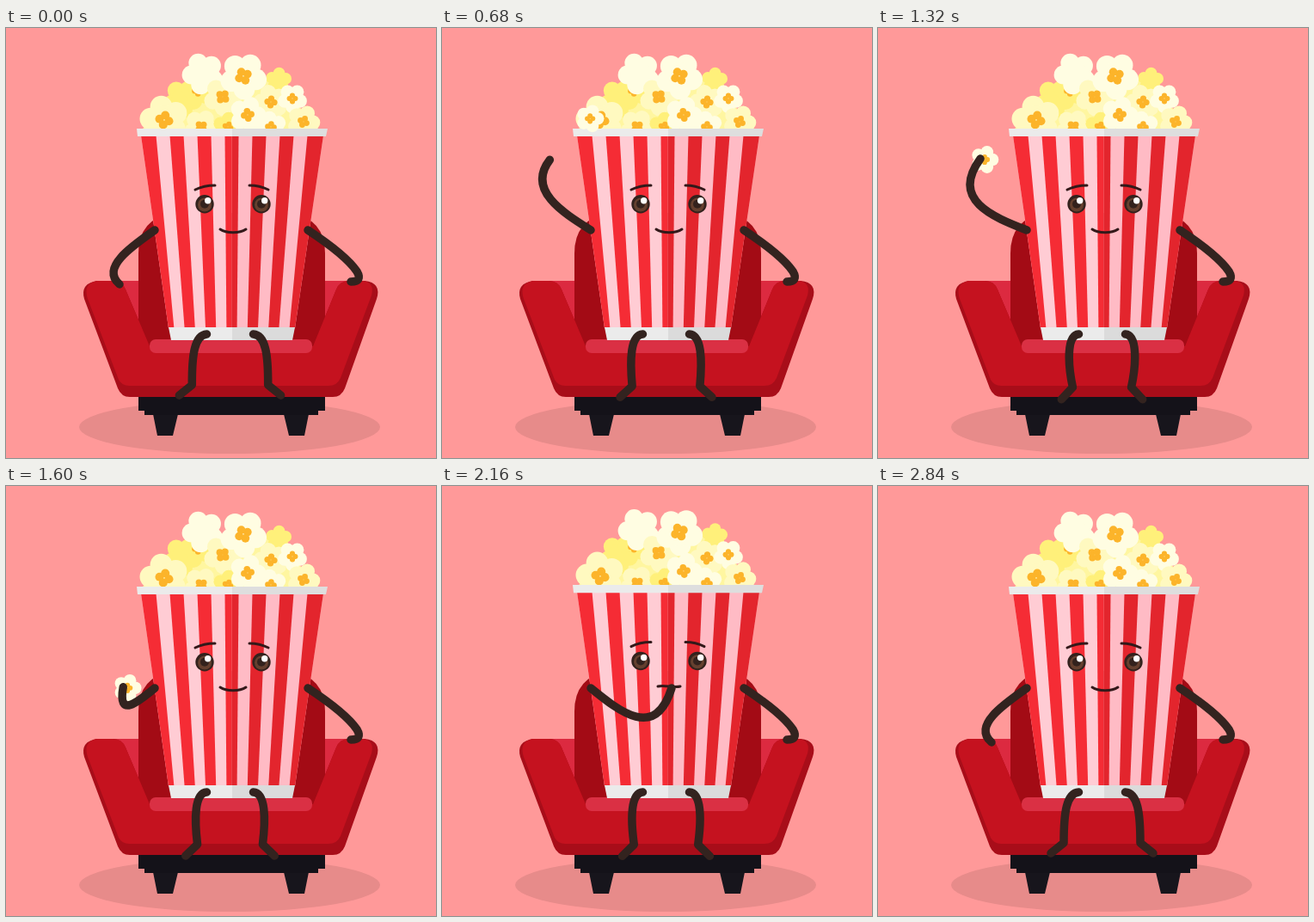
An HTML page that plays this animation: 500 px wide and 500 px high, repeating every 2.88 s.

```html
<!DOCTYPE html>
<html lang="en">
<head>
<meta charset="utf-8">
<title>Popcorn on a sofa</title>
<style>
  html, body { margin: 0; width: 100%; height: 100%; overflow: hidden; background: #ff9999; }
  svg { display: block; width: 100%; height: 100%; }
  .limb { fill: none; stroke: #33231f; stroke-width: 9.5; stroke-linecap: round; stroke-linejoin: round; }
  .line { fill: none; stroke: #33191a; stroke-width: 3; stroke-linecap: round; stroke-linejoin: round; }
</style>
</head>
<body>
<svg viewBox="0 0 500 500">
  <ellipse cx="260" cy="464" rx="175" ry="31" fill="#e78b8a"/>

  <g id="sofa">
    <path d="M171 449H200L194 474H176ZM323 449H352L347 474H329Z" fill="#17151c"/>
    <path d="M154 428H371V445H363V450H161V445H154Z" fill="#141219"/>
    <path d="M104 294H160V380H130ZM365 294H418L390 380H365Z" fill="#dc2a40"/>
    <path d="M154 380V262Q154 222 194 215H331Q371 222 371 262V380Z" fill="#a30b15"/>
    <path id="frame" d="M106 294H124Q135 294 139 304L167 370H357L384 304Q388 294 399 294H417Q437 296 431 315L394 419Q390 429 380 429H144Q134 429 130 419L91 315Q86 297 106 294Z" fill="#a80d19"/>
    <path d="M106 294H124Q135 294 139 304L167 370H357L384 304Q388 294 399 294H415Q429 296 425 311L389 407Q385 416 375 416H143Q135 416 131 409L95 315Q89 297 106 294Z" fill="#c5121f"/>
    <rect x="167" y="362" width="189" height="16" rx="7" fill="#da3044"/>
  </g>

  <g id="bucket">
    <g id="heap"></g>
    <clipPath id="cup"><path d="M157 125H369L336 349H189Z"/></clipPath>
    <g id="stripes" clip-path="url(#cup)"></g>
    <path d="M152 117H263V126H153Z" fill="#ebebeb"/>
    <path d="M263 117H374L372 126H263Z" fill="#dedede"/>
    <path d="M189 348H263V363H192Z" fill="#ebebeb"/>
    <path d="M263 348H336L333 363H263Z" fill="#dbdbdb"/>
    <g id="eyes"></g>
    <path class="line" d="M220 188Q230 183 243 183M283 183Q295 183 305 188"/>
    <path class="line" id="mouth" style="fill:#33191a"/>
  </g>

  <path class="limb" id="legL"/>
  <path class="limb" id="legR" transform="matrix(-1 0 0 1 521 0)"/>
  <path class="limb" d="M351 235Q395 264 408 283Q415 295 401 295"/>
  <g id="snack"></g>
  <path class="limb" id="arm"/>
</svg>

<script>
const LOOP = 2880, TAU = 2 * Math.PI;
const $ = id => document.getElementById(id);
const circle = (x, y, r, fill) => `<circle cx="${x}" cy="${y}" r="${r}" fill="${fill}"/>`;

// A ring of equal circles
const ring = (x, y, count, dist, r, turn, fill) => Array.from({ length: count }, (_, i) => {
  const a = turn + i * TAU / count;
  return circle(x + Math.cos(a) * dist, y + Math.sin(a) * dist, r, fill);
}).join('');

const TONES = { white: '#fffde2', cream: '#fff9c0', yellow: '#fff07a' };
const popcorn = (x, y, r, tone, heart = true) =>
  ring(x, y, 5, r * .56, r * .46, x + y, TONES[tone]) + circle(x, y, r * .6, TONES[tone]) +
  (heart ? ring(x, y, 4, r * .2, r * .18, x, '#fcb42a') : '');

$('heap').innerHTML =
  '<path d="M158 118L190 88L230 56H300L340 90L362 118Z" fill="#fff6a0"/>' +
  popcorn(206, 82, 22, 'yellow', false) +
  popcorn(317, 61, 15, 'yellow', false) +
  popcorn(223, 73, 18, 'yellow') +
  popcorn(229, 53, 24, 'white', false) +
  popcorn(252, 80, 22, 'cream') +
  popcorn(276, 56, 27, 'white') +
  popcorn(308, 86, 20, 'cream') +
  popcorn(333, 82, 17, 'white') +
  popcorn(346, 109, 19, 'cream') +
  popcorn(227, 115, 20, 'cream') +
  popcorn(258, 115, 17, 'yellow') +
  popcorn(308, 115, 18, 'white') +
  popcorn(281, 101, 21, 'white') +
  popcorn(184, 107, 28, 'cream');

// Stripes converge from the rim to the foot, each half with its own shade
const AXIS = 262.5;
const stripe = (from, to, fill) =>
  `<path d="M${AXIS + from * 16} 125H${AXIS + to * 16}L${AXIS + to * 12.2} 349H${AXIS + from * 12.2}Z" fill="${fill}"/>`;
let stripes = stripe(-7, 0, '#ffccd4') + stripe(0, 7, '#ffbbc5');
for (let i = 0; i <= 6; i += 2) {
  const inner = Math.max(i - .5, 0), outer = i === 6 ? 7 : i + .5;
  stripes += stripe(-outer, -inner, '#f52c35') + stripe(inner, outer, '#e3252d');
}
$('stripes').innerHTML = stripes;

$('eyes').innerHTML = [231, 297].map(x =>
  circle(x, 204.7, 10.7, '#33221d') + circle(x, 205.5, 8, '#65402f') +
  circle(x, 204.7, 5, '#33221d') + circle(x + 3.7, 200.7, 3.7, '#fff')).join('');

$('snack').innerHTML = popcorn(0, 0, 16, 'white');

// Arm poses: elbow pull and hand
const SHOULDER = [173, 235];
const rest = [110, 279, 132, 298];
const reach = [97, 257, 125, 261];
const swingOut = [93, 245, 104, 226];
const grab = [105, 139, 152, 104];
const lift = [84, 200, 119, 152];
const lower = [102, 265, 114, 235];
const feed = [234, 282, 258, 228];
const chewing = [248, 296, 267, 235];
const armKeys = [
  [0, rest], [100, rest], [400, reach], [490, swingOut], [900, grab], [1080, grab],
  [1320, lift], [1500, lower], [1880, feed], [2000, chewing], [2240, chewing],
  [2740, rest], [LOOP, rest]
];

// Monotone cubic interpolation through timed poses
function poseAt(keys, t) {
  const i = keys.findIndex((_, n) => t < keys[n + 1][0]);
  const [t0, from] = keys[i], [t1, to] = keys[i + 1];
  const span = t1 - t0, u = (t - t0) / span;
  const slope = (n, c) => keys[n] && keys[n + 1]
    ? (keys[n + 1][1][c] - keys[n][1][c]) / (keys[n + 1][0] - keys[n][0]) : 0;
  const tangent = (n, c) => {
    const a = slope(n - 1, c), b = slope(n, c);
    return a * b > 0 ? 2 * a * b / (a + b) : 0;
  };
  return from.map((p, c) => p + (to[c] - p) * u * u * (3 - 2 * u)
    + span * u * (1 - u) * ((1 - u) * tangent(i, c) - u * tangent(i + 1, c)));
}
const ramp = (t, a, b) => {
  const u = Math.min(1, Math.max(0, (t - a) / (b - a)));
  return u * u * (3 - 2 * u);
};
const mix = (a, b, u) => a + (b - a) * u;

function drawLegs(t) {
  const k = (1 - Math.cos((t + 50) / 960 * TAU)) / 2;
  const path = `M233.5 356C219 357 ${216 + 5 * k} ${380 + 12 * k} ${216 + 11 * k} ${415 + 3 * k}` +
    `L${201 + 13 * k} ${427 + 5 * k}`;
  $('legL').setAttribute('d', path);
  $('legR').setAttribute('d', path);
}

function drawArm(t) {
  const [ex, ey, hx, hy] = poseAt(armKeys, t), [sx, sy] = SHOULDER;
  $('arm').setAttribute('d',
    `M${sx} ${sy}C${mix(sx, ex, .45)} ${mix(sy, ey, .45)} ${ex} ${ey} ${hx} ${hy}`);

  const held = ramp(t, 640, 900);
  const size = ramp(t, 160, 360) * (1 - ramp(t, 1890, 1980));
  $('snack').setAttribute('transform',
    `translate(${mix(175, hx + 5, held)} ${mix(102, hy + 1, held)}) scale(${size})`);
}

function drawBucket(t) {
  const chew = t > 2120 && t < 2780 ? Math.sin((t - 2120) / 440 * TAU) ** 2 : 0;
  $('bucket').setAttribute('transform', `translate(0 362) scale(1 ${1 + .027 * chew}) translate(0 -362)`);

  const flat = ramp(t, 1680, 1820) - ramp(t, 2640, 2860);
  const open = ramp(t, 1680, 1820) - ramp(t, 1900, 2000);
  const wave = 2 * (flat - open), y = 234;
  const a = 249 + 2 * flat, b = 279 - 2 * flat;
  const up = mix(5, 0, flat), low = up + 7 * open;
  $('mouth').setAttribute('d',
    `M${a} ${y}C${a + 7} ${y + up - wave} ${b - 7} ${y + up + wave} ${b} ${y}` +
    `C${b - 7} ${y + low + wave} ${a + 7} ${y + low - wave} ${a} ${y}Z`);
}

function draw(t) {
  drawLegs(t);
  drawArm(t);
  drawBucket(t);
}

const start = performance.now();
function tick() {
  const t = Math.max(0, performance.now() - start) % LOOP;
  draw(Math.floor(t / 40) * 40);
  requestAnimationFrame(tick);
}
draw(0);
requestAnimationFrame(tick);
</script>
</body>
</html>
```
